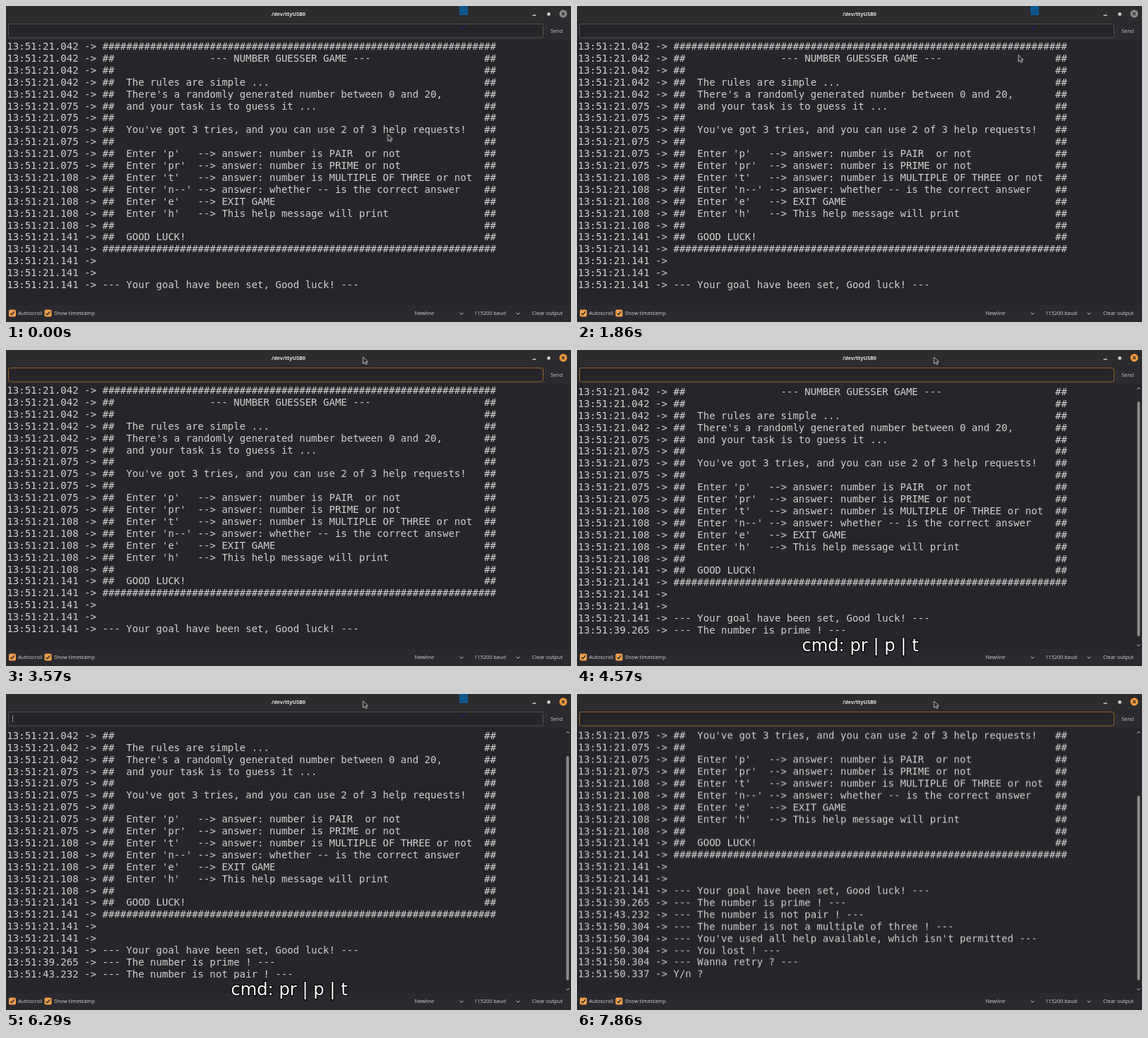
Recreate the animation shown at these times as an HTML page. Size 800 by 448 pixels, loop 8000 ms.

```html
<!DOCTYPE html>
<html lang="en">
<head>
<meta charset="utf-8">
<title>Serial monitor</title>
<style>
  html, body { margin: 0; width: 100%; height: 100%; overflow: hidden; background: #262529; }
  svg { display: block; width: 800px; height: 448px; }
  text { white-space: pre; }

  .ui { font: 500 7.4px "Open Sans", "Noto Sans", sans-serif; fill: #d6d4d2; }
  .title { font-weight: 700; font-size: 7.3px; text-anchor: middle; fill: #e6e4e2; }
  .console { font: 14.04px "DejaVu Sans Mono", monospace; fill: #d2d1d0; }
  .caption {
    font: 24.2px "DejaVu Sans", sans-serif; text-anchor: middle;
    fill: #fff; stroke: #000; stroke-width: 2.4px; stroke-linejoin: round; paint-order: stroke;
  }
  .line { fill: none; stroke: #d6d4d2; }

  .step { animation: 8s step-end infinite; }
  .scroll { animation-name: scroll; }
  .bar { animation-name: bar; }
  .thumb { animation-name: thumb; }
  .caption { animation-name: caption; }
  .field { animation-name: field; }
  .close { animation-name: close; }
  .badge { animation-name: badge; }
  .caret { animation: caret 1s step-end infinite; }
  .pointer { animation: pointer 8s ease-in-out infinite; }

  @keyframes scroll {
    0% { transform: translateY(0); }
    55% { transform: translateY(-15px); }
    70% { transform: translateY(-32px); }
    91.25%, 100% { transform: translateY(-116.5px); }
  }
  @keyframes bar { 0% { opacity: 0; } 55%, 100% { opacity: 1; } }
  @keyframes thumb {
    0% { y: 73px; height: 333px; }
    70% { y: 88px; height: 318px; }
    91.25%, 100% { y: 144px; height: 262px; }
  }
  @keyframes caption { 0% { opacity: 0; } 46.25% { opacity: 1; } 91.25%, 100% { opacity: 0; } }
  @keyframes field {
    0% { stroke: #57524d; }
    28.75% { stroke: #93642a; }
    71.25% { stroke: #504e4e; }
    83.75%, 100% { stroke: #93642a; }
  }
  @keyframes close { 0% { fill: #8b8988; } 28.75%, 100% { fill: #f39a3c; } }
  @keyframes badge {
    0% { opacity: 1; }
    28.75% { opacity: 0; }
    71.25% { opacity: 1; }
    83.75%, 100% { opacity: 0; }
  }
  @keyframes caret { 0% { opacity: 0; } 10% { opacity: 1; } 50%, 100% { opacity: 0; } }
  @keyframes pointer {
    0%, 1.5% { transform: translate(540.5px, 182px); }
    13%, 18% { transform: translate(745.5px, 129.5px); }
    28.5%, 100% { transform: translate(505.5px, 10px); }
  }
</style>
</head>
<body>
<svg viewBox="0 0 800 448">
  <defs>
    <clipPath id="view"><rect y="50" width="790" height="354"/></clipPath>
    <g id="check">
      <rect width="10" height="10" rx="2" fill="#f5a04a"/>
      <path d="M2.3 5.2 4.2 7.2 7.8 2.8" fill="none" stroke="#2b2a2c" stroke-width="1.5"/>
    </g>
    <path id="chevron" class="line" d="M-2.3-1.2 0 1.2 2.3-1.2"/>
  </defs>

  <rect width="800" height="448" fill="#262529"/>
  <rect width="800" height="22" fill="#2c2b2e"/>
  <rect y="22" width="800" height="26" fill="#2a292d"/>
  <rect y="424" width="800" height="24" fill="#2a292d"/>

  <text class="ui title" x="400" y="13.5">/dev/ttyUSB0</text>
  <path class="line" d="M745.5 13.2h5" stroke-width="1.4"/>
  <rect x="766.5" y="9.5" width="4" height="4" fill="#e0dedc"/>
  <circle class="step close" cx="789" cy="11" r="5.5"/>
  <path d="M787 9l4 4m0-4l-4 4" stroke="#2b2a2c" stroke-width="1.1"/>

  <rect class="step field" x="3.5" y="25.5" width="757" height="19.5" rx="2.5" fill="#252428"/>
  <path class="caret" d="M9.5 30v10" stroke="#aaa8a6" stroke-width=".8"/>
  <path d="M764.5 24v22" stroke="#343337"/>
  <text class="ui" x="771" y="37.5">Send</text>

  <g class="step badge">
    <rect x="642" width="12" height="13" fill="#0b588f"/>
    <path d="M642 9.5h5l2-2h5" fill="none" stroke="#08446f"/>
    <path d="M644.5 33l2-2.5m1.5-2 2-1" stroke="#2020b0" stroke-width="1.3"/>
  </g>

  <g clip-path="url(#view)"><g id="log" class="console step scroll"></g></g>

  <g class="step bar">
    <path class="line" d="M793 55.5l2.2-2.3 2.2 2.3M793 417.5l2.2 2.3 2.2-2.3"/>
    <rect class="step thumb" x="793.3" y="73" width="3.8" height="333" rx="1.9" fill="#8d8b8b"/>
  </g>

  <use href="#check" x="4" y="430.5"/>
  <text class="ui" x="17" y="438.3">Autoscroll</text>
  <use href="#check" x="54.5" y="430.5"/>
  <text class="ui" x="68" y="438.3">Show timestamp</text>
  <text class="ui" x="578.5" y="438.3">Newline</text>
  <use href="#chevron" x="645" y="436"/>
  <text class="ui" x="663" y="438.3">115200 baud</text>
  <use href="#chevron" x="725" y="436"/>
  <text class="ui" x="745" y="438.3">Clear output</text>

  <text class="caption step" x="401" y="427">cmd: pr | p | t</text>

  <path class="pointer" d="M0 0V9.4L2.3 7.4 3.9 10.6 5.5 9.8 4 6.8H7Z"
        fill="#222125" stroke="#d8d6d5" stroke-width=".9"/>
</svg>

<script>
const ROW = 16.9;
const rule = '#'.repeat(66);
const boxed = (text = '') => `##  ${text}`.padEnd(64) + '##';
const note = text => `--- ${text} ---`;

const blocks = [
  ['21.042', rule, boxed(' '.repeat(14) + note('NUMBER GUESSER GAME')), boxed(),
    boxed('The rules are simple ...'),
    boxed("There's a randomly generated number between 0 and 20,")],
  ['21.075', boxed('and your task is to guess it ...'), boxed(),
    boxed("You've got 3 tries, and you can use 2 of 3 help requests!"), boxed(),
    boxed("Enter 'p'   --> answer: number is PAIR  or not"),
    boxed("Enter 'pr'  --> answer: number is PRIME or not")],
  ['21.108', boxed("Enter 't'   --> answer: number is MULTIPLE OF THREE or not"),
    boxed("Enter 'n--' --> answer: whether -- is the correct answer"),
    boxed("Enter 'e'   --> EXIT GAME"),
    boxed("Enter 'h'   --> This help message will print"), boxed()],
  ['21.141', boxed('GOOD LUCK!'), rule, '', '',
    note('Your goal have been set, Good luck!')],
  ['39.265', note('The number is prime !')],
  ['43.232', note('The number is not pair !')],
  ['50.304', note('The number is not a multiple of three !'),
    note("You've used all help available, which isn't permitted"),
    note('You lost !'), note('Wanna retry ?')],
  ['50.337', 'Y/n ?'],
];

const log = document.getElementById('log');
blocks
  .flatMap(([stamp, ...lines]) => lines.map(line => `13:51:${stamp} -> ${line}`))
  .forEach((line, i) => {
    const text = document.createElementNS(log.namespaceURI, 'text');
    text.setAttribute('x', 1.3);
    text.setAttribute('y', 62 + i * ROW);
    text.textContent = line;
    log.append(text);
  });
</script>
</body>
</html>
```
